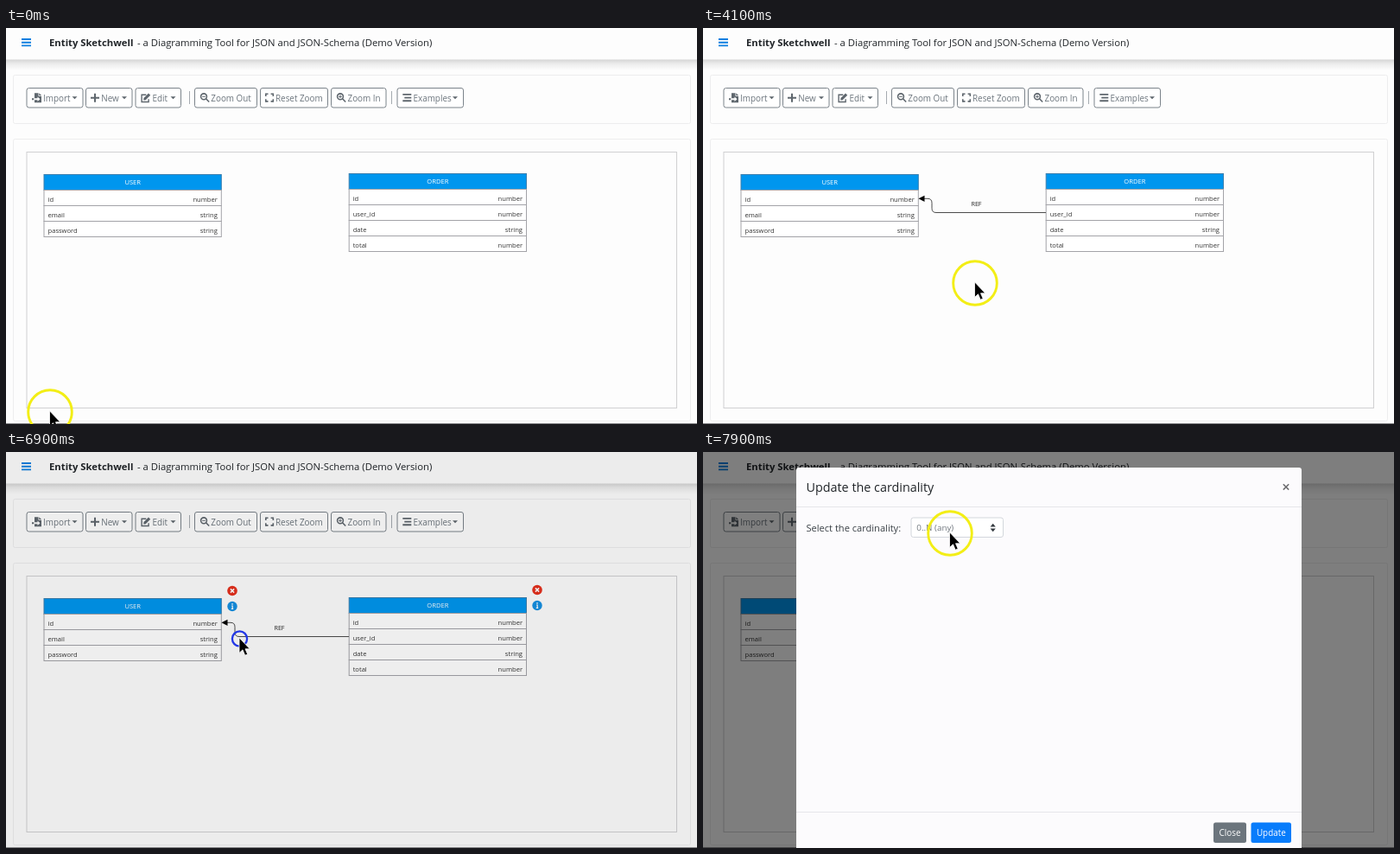
Recreate the animation shown at these times as an HTML page. Size 800 by 458 pixels, loop 8000 ms.

```html
<!DOCTYPE html>
<html lang="en">
<head>
<meta charset="utf-8">
<title>Entity Sketchwell</title>
<style>
  html, body { margin: 0; width: 100%; height: 100%; overflow: hidden; background: #fdfdfd; }
  svg { display: block; width: 100vw; height: 100vh; }
  text { font-family: "Open Sans", "Noto Sans", sans-serif; white-space: pre; }
  .head { font-size: 11.3px; fill: #212529; }
  .btn { fill: #fff; stroke: #7b838a; }
  .btn-text { font-size: 9.9px; fill: #6c757d; }
  .icon { fill: none; stroke: #5f676e; stroke-width: 1.6; }
  .solid { fill: #5f676e; }
  .cell { fill: #fff; stroke: #a3a3a8; }
  .cell-head { fill: #0096ee; stroke: #3b7fae; }
  .small { font-size: 7.6px; fill: #333; }
  .card { fill: #fdfdfd; stroke: #ededee; }
  .rule { stroke: #e6e6ea; }
  .end { text-anchor: end; }
  .mid { text-anchor: middle; }
</style>
</head>
<body>
<svg viewBox="0 0 800 458" preserveAspectRatio="none">
  <defs>
    <linearGradient id="shade" x1="0" y1="0" x2="0" y2="1">
      <stop offset="0" stop-color="#000" stop-opacity=".17"/>
      <stop offset=".4" stop-color="#000" stop-opacity=".07"/>
      <stop offset="1" stop-color="#000" stop-opacity="0"/>
    </linearGradient>
  </defs>

  <rect width="800" height="458" fill="#fdfdfd"/>
  <rect y="36" width="800" height="13" fill="url(#shade)"/>
  <rect width="800" height="36.5" fill="#fdfdfd"/>
  <path d="M18 13h11M18 16.7h11M18 20.4h11" stroke="#0d7fe0" stroke-width="1.9"/>
  <text class="head" x="50" y="21" font-weight="700">Entity Sketchwell</text>
  <text class="head" x="152" y="21">- a Diagramming Tool for JSON and JSON-Schema (Demo Version)</text>

  <rect class="card" x="8.5" y="54.5" width="784" height="56" rx="2"/>
  <rect class="card" x="8.5" y="128.5" width="784" height="326" rx="2"/>
  <rect x="24" y="143.5" width="752.5" height="296" fill="#fdfdfd" stroke="#d0d0d2"/>
  <path d="M212.5 73v15M446.5 73v15" stroke="#a5aaaf"/>

  <g id="bar"></g>
  <g id="tables"></g>

  <g id="link">
    <path id="wire" fill="none" stroke="#4c4c4c"/>
    <path id="tip" d="M0 0l7-3.6v7.2z" fill="#000"/>
    <text id="label" class="mid" x="316.5" y="206" font-size="7.1" fill="#222">REF</text>
  </g>
  <g id="tools"></g>
  <path d="M0 457.5h800" stroke="#8d8d90"/>
  <rect id="dim" width="800" height="458" opacity="0"/>

  <g id="modal" opacity="0">
    <rect x="108" width="585" height="445" rx="3" fill="#fcfbfd"/>
    <path class="rule" d="M108 45.5h585M108 398.5h585"/>
    <text x="119.5" y="28" font-size="14.36" fill="#212529">Update the cardinality</text>
    <path d="M671.8 19.2l6.4 6.4m0-6.4l-6.4 6.4" stroke="#6d6d70" stroke-width="1.5"/>
    <text x="119.5" y="73.6" font-size="11.1" fill="#3a4046">Select the cardinality:</text>
    <rect x="241" y="58" width="106.5" height="22.5" rx="2.5" fill="#fff" stroke="#d3d7dc"/>
    <text x="247.3" y="73" font-size="9.8" fill="#6f767d">0..N (any)</text>
    <path d="M332.6 68.6l3.1-3.9 3.1 3.9zM332.6 70.4l3.1 3.9 3.1-3.9z" fill="#343a40"/>
    <rect x="591" y="410.5" width="38" height="23.5" rx="2.5" fill="#6c757d"/>
    <rect x="634.5" y="410.5" width="46.5" height="23.5" rx="2.5" fill="#087cfb"/>
    <g class="mid" font-size="9.9" fill="#fff">
      <text x="610" y="425.8">Close</text>
      <text x="657.8" y="425.8">Update</text>
    </g>
  </g>

  <g id="mouse">
    <circle id="ring" fill="none"/>
    <path id="arrow" d="M-.5-1.2V16.4L3.5 12.8 6.2 19.2 9.2 17.9 6.5 11.8H11.8Z" fill="#000" stroke="#fff" stroke-width=".8"/>
    <path id="cross" d="M-7-.5H7M0-7.5V6.5" stroke="#222" stroke-width="1.3"/>
  </g>
</svg>
<script>
const $ = id => document.getElementById(id);
const set = (id, attrs) => {
  for (const k in attrs) $(id).setAttribute(k, attrs[k]);
};
const show = (id, on) => set(id, { visibility: on ? 'visible' : 'hidden' });

// Toolbar
const lens = sign => `<circle class="icon" cx="4" cy="4" r="3.4"/>
  <path class="icon" d="M6.5 6.5l3.7 3.7" stroke-width="2"/>
  <path class="icon" d="M2.2 4h3.6${sign === '+' ? 'M4 2.2v3.6' : ''}" style="stroke-width:1"/>`;
const icons = {
  file: `<path class="solid" d="M2.5 0H7v3.5h3.5V11h-8V8H6v1.8L9 7 6 4.2V6H2.5zM7.8 0l2.7 2.7H7.8zM-.5 6h2.3v2h-2.3z"/>`,
  plus: `<path class="icon" d="M0 5.5h10M5 .5v10" style="stroke-width:2"/>`,
  edit: `<path class="icon" d="M6 2H.8v8.2h8V7" style="stroke-width:1.4"/>
    <path class="solid" d="M3.2 5.7L8.7.2l2.2 2.2-5.5 5.5-2.5.4z"/>`,
  out: lens('-'),
  fit: `<path class="icon" d="M.5 3.6V1h2.7M6.3 1H9v2.6M9 7v2.6H6.3M3.2 9.6H.5V7"/>`,
  in: lens('+'),
  list: `<path class="icon" d="M0 1.6h10M2 5.3h8M0 9h10" style="stroke-width:1.9"/>`
};
const button = ([x, w, icon, ix, label, tx, caret]) => `
  <rect class="btn" x="${x}" y="69.5" width="${w}" height="22.5" rx="2.5"/>
  <g transform="translate(${ix} 75.3)">${icons[icon]}</g>
  <text class="btn-text" x="${tx}" y="84.6">${label}</text>
  ${caret ? `<path class="solid" d="M${caret} 79.2h6l-3 3z"/>` : ''}`;
$('bar').innerHTML = [
  [24, 65, 'file', 30.5, 'Import', 43, 76.5],
  [92.5, 53.5, 'plus', 98, 'New', 110.3, 134],
  [150, 52.5, 'edit', 156.3, 'Edit', 169.5, 190.5],
  [218.5, 72, 'out', 225, 'Zoom Out', 237.3],
  [294.5, 78, 'fit', 300.3, 'Reset Zoom', 312],
  [376.5, 63.5, 'in', 383, 'Zoom In', 395.5],
  [453, 76.5, 'list', 459.3, 'Examples', 471.5, 517]
].map(button).join('');

// Entity tables and their tool icons
const table = (x, y, name, rows) => `
  <rect class="cell-head" x="${x}" y="${y}" width="205.3" height="18"/>
  <text class="small mid" x="${x + 102.7}" y="${y + 11.6}" style="fill:#fff">${name}</text>` +
  rows.map(([key, type], i) => {
    const top = y + 18 * (i + 1);
    return `<rect class="cell" x="${x}" y="${top}" width="205.3" height="18"/>
      <text class="small" x="${x + 4.5}" y="${top + 13.6}">${key}</text>
      <text class="small end" x="${x + 200.8}" y="${top + 13.6}">${type}</text>`;
  }).join('');
$('tables').innerHTML =
  table(44, 169.5, 'USER', [['id', 'number'], ['email', 'string'], ['password', 'string']]) +
  table(397.2, 168.5, 'ORDER', [['id', 'number'], ['user_id', 'number'], ['date', 'string'], ['total', 'number']]);
$('tools').innerHTML = [[262, 160.5], [615, 159.5]].map(([x, y]) => `
  <g transform="translate(${x} ${y})">
    <circle r="5.8" fill="#e5301d"/>
    <path d="M-2.1-2.1l4.2 4.2m0-4.2l-4.2 4.2" stroke="#fff" stroke-width="1.5"/>
    <circle cy="18" r="5.7" fill="#1590e2"/>
    <path d="M0 14.6v1.6M-.9 17.5H.2v3.3M-1.2 20.8h2.4" fill="none" stroke="#fff" stroke-width="1.2"/>
  </g>`).join('');

// Keys are [time, value, ...]; eased between neighbours when asked
const smooth = p => p * p * (3 - 2 * p);
function at(keys, t, ease = p => p) {
  let i = keys.findIndex(k => k[0] > t);
  if (i < 0) return keys[keys.length - 1].slice(1);
  if (i === 0) return keys[0].slice(1);
  const a = keys[i - 1], b = keys[i];
  const p = ease((t - a[0]) / (b[0] - a[0]));
  return a.slice(1).map((v, n) => v + (b[n + 1] - v) * p);
}
const within = (t, spans) => spans.some(([a, b]) => t >= a && t < b);

const path = [
  [0, 51, 444], [500, 349, 213], [600, 349, 213], [900, 366, 240], [1500, 393, 214],
  [1900, 393, 214], [2600, 340, 205], [3000, 258, 197], [3300, 258, 197],
  [3400, 274, 222], [3500, 302, 272], [3600, 315, 295], [4600, 315, 295],
  [5500, 290, 218], [6000, 263, 219], [6400, 270.5, 216], [7300, 270.5, 216], [7900, 286, 94]
];
const dimKeys = [[6800, 0], [6900, .065], [7000, .3], [7100, .47], [7200, .5]];
const fadeKeys = [[7000, 0], [7100, .55], [7200, .99], [7300, 1]];
const dropKeys = [[7000, -29], [7100, -10], [7200, 6], [7300, 12], [7400, 18]];
const pressed = [[1900, 3400], [6700, 7400]];
const hovered = [[1200, 2300], [3400, 3600], [5300, 8000]];

function drawLink(t, x, y) {
  const joined = t >= 3000;
  if (joined) [x, y] = [249.5, 197.3];
  const bend = Math.min(x + 15.5, 397), h = 213.5 - y;
  const r = Math.max(0, Math.min(5, h / 2, 397 - bend));
  set('wire', { d: `M397 213.5H${bend + r}q${-r} 0 ${-r} ${-r}V${y + r}q0 ${-r} ${-r} ${-r}H${x + 5}` });
  set('tip', { transform: `translate(${x} ${y})` });
  show('link', t >= 2100);
  show('label', joined);
}

function draw(t) {
  const [x, y] = at(path, t, smooth);
  const down = within(t, pressed), aim = within(t, [[1400, 3400]]);
  set('mouse', { transform: `translate(${x} ${y})` });
  set('ring', down
    ? { r: 8.6, stroke: '#2338e6', 'stroke-width': 2.3 }
    : { r: 25.3, stroke: '#f3ee16', 'stroke-width': 2.9 });
  show('cross', aim);
  show('arrow', !aim);
  show('tools', within(t, hovered));
  drawLink(t, x, y);
  set('dim', { opacity: at(dimKeys, t)[0] });
  set('modal', { opacity: at(fadeKeys, t)[0], transform: `translate(0 ${at(dropKeys, t)[0]})` });
}

const start = performance.now();
function tick() {
  const t = (performance.now() - start) % 8000;
  draw(Math.floor(t / 100) * 100);
  requestAnimationFrame(tick);
}
tick();
</script>
</body>
</html>
```
